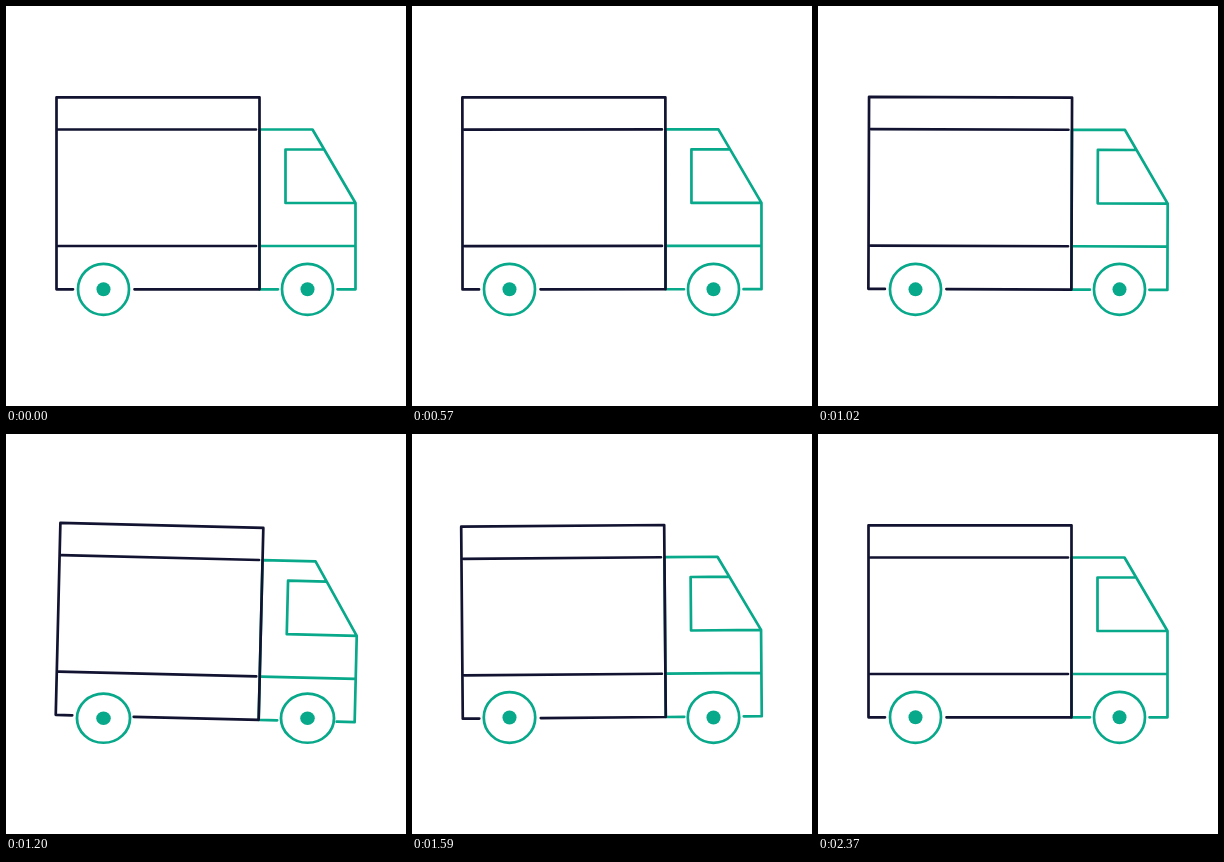
Write an HTML page that moves like this. It is 400x400 px and loops after 4.46 s.

```html
<!DOCTYPE html>
<html lang="en">
<head>
<meta charset="utf-8">
<title>Truck</title>
<style>
html, body { margin: 0; height: 100%; overflow: hidden; background: #fff; }
svg { display: block; width: 100%; height: 100%; fill: none; stroke-width: 2.7; stroke-linecap: round; stroke-linejoin: round; }
.dark { stroke: #121331; }
.teal { stroke: #08a88a; }
.hub { fill: #08a88a; stroke: none; }
</style>
</head>
<body>
<svg viewBox="0 0 400 400">
  <g id="body">
    <path class="teal" d="M272 283.3H253.5V123.5H306.5L349.5 197V283.3H331.5M255 240H349M318 143.5H279.5V197H349.5"/>
    <path class="dark" d="M67 283.3H50.5V91.3H253.5V283.3H128.5M52.5 123.5H250M52.5 240H250"/>
  </g>
  <g class="wheel">
    <circle class="teal" cx="97.5" cy="283.3" r="25.5"/>
    <circle class="hub" cx="97.5" cy="283.3" r="7"/>
  </g>
  <g class="wheel">
    <circle class="teal" cx="301.5" cy="283.3" r="25.5"/>
    <circle class="hub" cx="301.5" cy="283.3" r="7"/>
  </g>
  <path id="road" class="dark" d="M1.5 309.3H294.5"/>
</svg>
<script>
const LOOP = 4460, STEP = 30, GROUND = 309;
// [time, tilt in degrees]
const TILT = [[0, 0], [320, 1.36], [790, -1.2], [1230, 1.42], [1790, -1.22], [2270, 0], [LOOP, 0]];
const body = document.getElementById('body');
const road = document.getElementById('road');
const wheels = document.querySelectorAll('.wheel');
const wheelX = [97.5, 301.5];

function tiltAt(t) {
  const i = TILT.findIndex(k => k[0] > t);
  const [t0, a] = TILT[i - 1], [t1, b] = TILT[i];
  const ease = (1 - Math.cos(Math.PI * (t - t0) / (t1 - t0))) / 2;
  return a + (b - a) * ease;
}

// The road line crosses three times, right to left
function roadX(t) {
  return t < 1800 ? -211 + (330 - t % 600) * 2.6 : -400;
}

function draw(t) {
  const tilt = tiltAt(t);
  const squash = Math.min(1, tilt * tilt);
  body.setAttribute('transform', `translate(0 ${squash}) rotate(${tilt} 190 250)`);
  wheels.forEach((w, i) => w.setAttribute('transform',
    `translate(${wheelX[i]} ${GROUND}) scale(${1 + 0.04 * squash} ${1 - 0.035 * squash}) translate(${-wheelX[i]} ${-GROUND})`));
  road.setAttribute('transform', `translate(${roadX(t)} 0)`);
}

const start = performance.now();
function frame() {
  const t = (performance.now() - start) % LOOP;
  draw(Math.floor(t / STEP) * STEP);
  requestAnimationFrame(frame);
}
frame();
</script>
</body>
</html>
```
